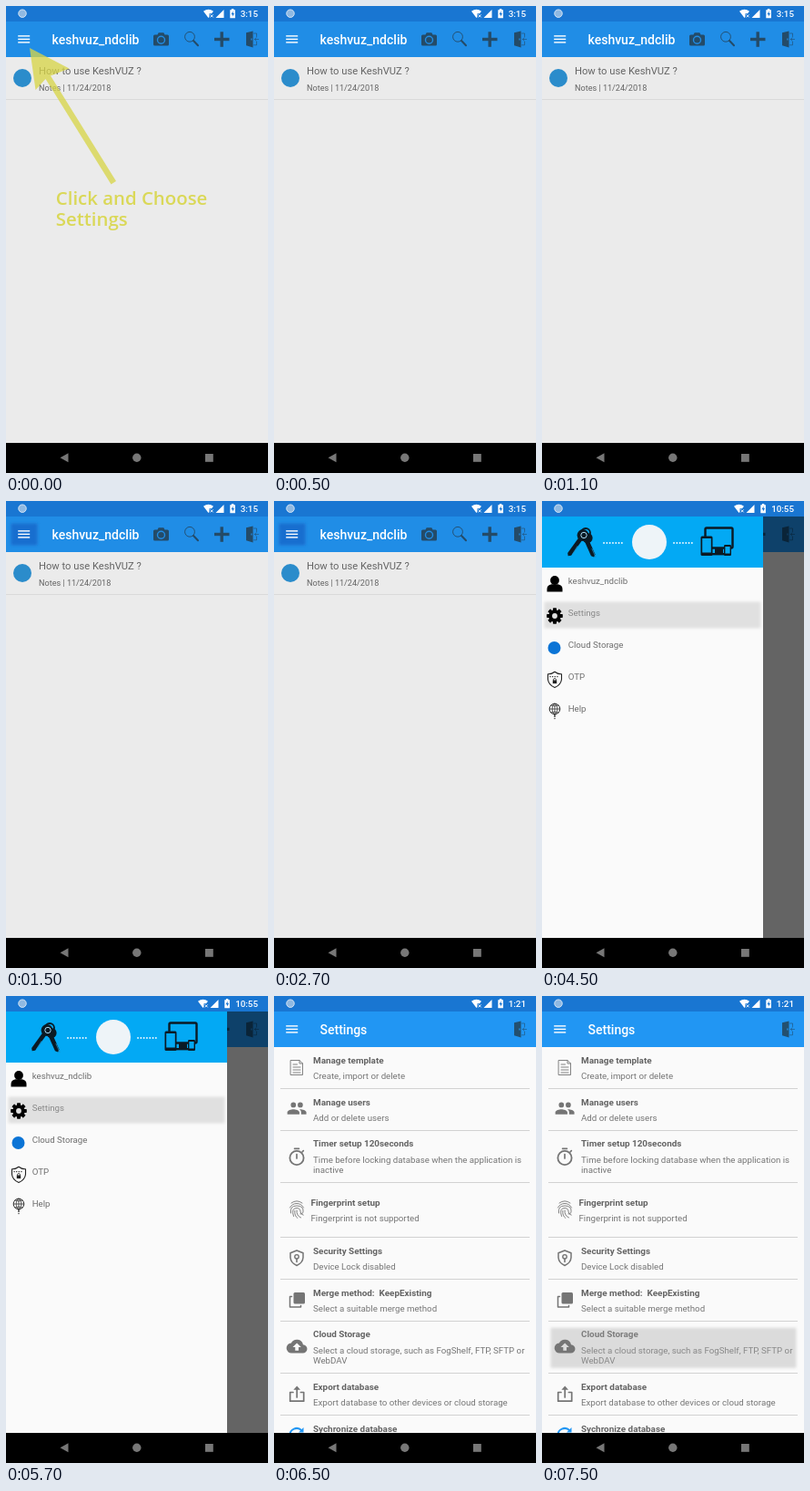
An HTML page that plays this animation: 288x512 px, repeating every 8000 ms.

```html
<!DOCTYPE html>
<html lang="en">
<head>
<meta charset="utf-8">
<title>Settings walkthrough</title>
<style>
html, body { margin: 0; width: 100%; height: 100%; overflow: hidden; background: #000; }
svg { display: block; width: 100%; height: 100%; font-family: Roboto, sans-serif; }
.bar { font-size: 14px; font-weight: 500; fill: #fff; }
.clock { font-size: 9.8px; font-weight: 500; fill: #fff; text-anchor: end; }
.item { font-size: 9.7px; }
.head { font-size: 9.9px; font-weight: 700; fill: #636363; }
.hint { font: 600 20.4px 'Open Sans', sans-serif; fill: #dad858; }
.line { fill: none; stroke-linecap: round; stroke-linejoin: round; }
</style>
</head>
<body>
<svg id="stage" viewBox="0 0 288 512" xmlns="http://www.w3.org/2000/svg"></svg>
<script>
const rect = (x, y, w, h, fill, more = '') =>
  `<rect x="${x}" y="${y}" width="${w}" height="${h}" fill="${fill}" ${more}/>`;
const disc = (x, y, r, fill) => `<circle cx="${x}" cy="${y}" r="${r}" fill="${fill}"/>`;
const ring = (x, y, r, color, w = 1) =>
  `<circle cx="${x}" cy="${y}" r="${r}" fill="none" stroke="${color}" stroke-width="${w}"/>`;
const shape = (d, fill, more = '') => `<path d="${d}" fill="${fill}" fill-rule="evenodd" ${more}/>`;
const line = (d, color, w = 1, more = '') =>
  `<path class="line" d="${d}" stroke="${color}" stroke-width="${w}" ${more}/>`;
const text = (x, y, s, cls, more = '') => `<text x="${x}" y="${y}" class="${cls}" ${more}>${s}</text>`;
const at = (x, y, body, scale = 1) => `<g transform="translate(${x} ${y}) scale(${scale})">${body}</g>`;
const group = (id, body) => `<g id="${id}">${body}</g>`;
const glow = (x, y, w, h, fill, alpha) =>
  rect(x, y, w, h, fill, `opacity="${alpha}" rx="1" filter="url(#soft)"`);

const APP = 'KeshVUZ', USER = 'keshvuz_ndclib';
const GREY = '#757575', DARK = '#244b68';
const page = (body, bar) => rect(0, 17, 288, 462, body) + rect(0, 17, 288, 39, bar);

// Status icons sit left of the clock, whose width depends on the time
function status(time, shift = 0) {
  return at(-shift, 0,
    shape('M217 5.8Q222.5 1.8 228 5.8L226 8.3H223.5V12L222.5 13Z', '#fff') +
    line('M225 9.7l2.4 2.4m0-2.4l-2.4 2.4', '#fff', .9) +
    shape('M239.5 4V13H230.5Z', '#fff') +
    shape('M246.3 4.2h1.6v-1.2h2.4v1.2h1.6v9h-5.6ZM249.6 5.6l-2.1 3.6h1.4v2.6l2.1-3.7h-1.4Z', '#fff')) +
    text(277, 12.4, time, 'clock');
}

const menu = [32.2, 35.7, 39.2].map(y => rect(13.2, y, 13, 1.4, '#fff')).join('');
const plus = rect(229, 34.8, 16.5, 3.4, DARK) + rect(235.5, 28.3, 3.4, 16.5, DARK);
const exit = color =>
  shape('M264 29.2L271.5 27.6V45.4L264 43.2ZM269.3 35.5v2h1.2v-2Z', color) +
  line('M272.5 30h3v3.5M272.5 42.8h3v-3.5M277.5 36.5h-4m1.6-1.8l-1.8 1.8l1.8 1.8', color, .8, 'opacity=".75"');

const camera =
  shape('M163.5 31.5h3l1.2-2.2h5.6l1.2 2.2h3q1.5 0 1.5 1.5v9q0 1.5-1.5 1.5h-14q-1.5 0-1.5-1.5v-9q0-1.5 1.5-1.5Z', DARK) +
  ring(170.5, 37.2, 4, '#208de6', 1.4);
const search = ring(202, 33.8, 5.4, DARK, .9) + line('M206 38l5 5.2', DARK, 2);

const home = page('#ebebeb', '#208de6') +
  group('press', glow(5.5, 24.5, 29, 24, '#1769cb', .85)) +
  menu + text(50.5, 41.6, USER, 'bar') + camera + search + plus + exit(DARK) + status('3:15') +
  disc(18, 79, 10, '#2b8ccb') +
  text(36, 75, `How to use ${APP} ?`, '', 'font-size="11.2" fill="#646464"') +
  text(36, 92.6, 'Notes | 11/24/2018', '', 'font-size="9.1" fill="#646464"') +
  rect(0, 102, 288, 1, '#dadada') +
  group('hint',
    shape('M26 46L69.5 68.5L49 76.5L121 192L115.5 195.5L43.5 80L32.5 92Z', '#d8d548', 'opacity=".76"') +
    text(54.8, 217.8, 'Click and Choose', 'hint') + text(54.8, 241, 'Settings', 'hint'));

// Drawer
const key = (angle, len) => `<g transform="rotate(${angle})">` +
  shape(`M-2.4 3h4.8v${len}l-2.4 2.5l-2.4-2.5Z`, '#0b1a24') + '</g>';
const keys = at(46, 36.5,
  key(36, 24) + key(-24, 22) + disc(-1, 1, 6.4, '#0b1a24') + disc(4, 4, 5.6, '#0b1a24') +
  ring(2, -1.5, 5, '#0b1a24', 1.8) + ring(0, 1, 3.2, '#a9d9f2', 1) +
  line('M-7 13l-5 8M9 16l4 9', '#1d8fc4', .8));
const devices = rect(179.5, 29.5, 30, 22, 'none', 'stroke="#0b1a24" stroke-width="2.4" rx="1.5"') +
  rect(190, 52, 9, 6, '#0b1a24') + rect(186, 57, 17, 2.4, '#0b1a24') +
  rect(174.5, 38.5, 13, 21.5, '#0b1a24', 'rx="1.5"') + rect(176.2, 41, 9.6, 15.5, '#03a9f4') +
  rect(200, 48, 8, 12, '#0b1a24', 'rx="1.2"') + rect(201.4, 50, 5.2, 7.5, '#03a9f4');
const dots = x => line(`M${x} 46h23`, '#e8f7ff', 1.8, 'stroke-dasharray=".1 3.2"');

const person = disc(14, 87, 4.9, '#000') + shape('M5.5 99.5v-3q0-4.2 5-5.2h7q5 1 5 5.2v3Z', '#000');
const gear = ring(14, 126, 4.8, '#000', 3.8) +
  Array.from({ length: 8 }, (_, i) =>
    `<rect x="12" y="117.2" width="4" height="4" rx=".7" transform="rotate(${i * 45} 14 126)"/>`).join('');
const otp = line('M14 187.2Q17.5 190 21.5 189.8V195.5Q21 201.5 14 204.5Q7 201.5 6.5 195.5V189.8Q10.5 190 14 187.2Z', '#222', 1.1) +
  rect(11.8, 196.5, 4.4, 3.6, '#222') + line('M12.6 196.5v-1.2q1.4-1.8 2.8 0v1.2', '#222', .8) +
  line('M9 192.6h10', '#222', 1.3, 'stroke-dasharray=".2 2.4"');
const globe = ring(14, 228, 5.8, '#333', 1) + line('M8.3 228h11.4M14 222.2v11.6M10 224q4 2 8 0M10 232q4-2 8 0', '#333', .8) +
  `<ellipse cx="14" cy="228" rx="2.8" ry="5.8" fill="none" stroke="#333" stroke-width=".8"/>` +
  line('M14 234v2.4M14 238.4v.1', '#333', 1.4);

const labels = [USER, 'Settings', 'Cloud Storage', 'OTP', 'Help'];
const drawer = page('#646464', '#0e416a') +
  rect(243, 34.8, 2.5, 3.2, '#0a2438') + exit('#0a2438') +
  rect(0, 17, 243, 462, '#fafafa') + rect(0, 17, 243, 56, '#03a9f4') +
  keys + dots(68) + disc(118, 45, 19, '#eef4f8') + dots(145) + devices +
  labels.map((s, i) => text(28.7, 91.2 + 35 * i, s, 'item', 'fill="#6e6e6e"')).join('') +
  group('pickSettings', glow(2.5, 110.5, 238, 29, '#b6b6b6', .37)) +
  person + gear + disc(13.5, 161, 7, '#0b74d6') + otp + globe + status('10:55', 6);

// Settings list: title baseline, title, subtitle lines, left edge
const rows = [
  [73.8, 'Manage template', ['Create, import or delete']],
  [119.7, 'Manage users', ['Add or delete users']],
  [165.4, 'Timer setup 120seconds', ['Time before locking database when the application is', 'inactive']],
  [229.8, 'Fingerprint setup', ['Fingerprint is not supported'], 40.5],
  [283, 'Security Settings', ['Device Lock disabled']],
  [328.6, 'Merge method:&#160; KeepExisting', ['Select a suitable merge method']],
  [374.4, 'Cloud Storage', ['Select a cloud storage, such as FogShelf, FTP, SFTP or', 'WebDAV']],
  [432, 'Export database', ['Export database to other devices or cloud storage']],
  [477.6, 'Sychronize database', []]
];
const row = ([y, title, subs, x = 43]) => text(x, y, title, 'head') +
  subs.map((s, i) => text(x, y + 17.4 + 11.5 * i, s, 'item', `fill="${GREY}"`)).join('');

const icons =
  line('M18.5 70.5h9.5l3.5 3.5v12.5h-13ZM28 70.5v3.5h3.5M21 75h4.5M21 78h8M21 81h8M21 84h8', GREY, .9) +
  at(13.7, 111.8, shape('M16 11a3 3 0 1 0 0-6a3 3 0 1 0 0 6ZM8 11a3 3 0 1 0 0-6a3 3 0 1 0 0 6Z' +
    'M8 13c-2.3 0-7 1.2-7 3.5V19h14v-2.5c0-2.3-4.7-3.5-7-3.5ZM16 13l-1 .1c1.2.8 2 1.9 2 3.4V19h6v-2.5c0-2.3-4.7-3.5-7-3.5Z', GREY), .95) +
  ring(25, 177.5, 7.6, GREY, 1.8) + line('M22.6 167.3h4.8M25 173.5v4.5M31 171l1.3-1.3', GREY, 1.7) +
  line('M19 227q6-4.5 12 0M17.5 232q2.5-4.5 7.5-4.5t7.5 4.5M18.5 238q-1.5-8 6.5-8t7 7q-.5 2.5-3 2' +
    'M21.5 241.5q-3-9 3.5-9q4 0 4.2 4.5q1 3 3 3.2M25 235q-.5 6 4.5 8M22.8 235.5q-.5 5.5 3 8', GREY, .9) +
  line('M25 279l7 2.8v5q-.5 6-7 8.7q-6.5-2.7-7-8.7v-5Z', GREY, 1.5) + ring(25, 285.8, 2.2, GREY, 1.4) +
  line('M25 288.5v3', GREY, 1.6) +
  rect(21.5, 325, 12.5, 12.5, GREY, 'rx="1.5"') + line('M19.5 329.5h-2v11.5h12v-1.5', GREY, 1.5) +
  at(14, 373, shape('M19.3 10A7.5 7.5 0 0 0 5.3 8A6 6 0 0 0 6 20H19A5 5 0 0 0 19.3 10ZM14 13v4h-4v-4H7l5-5l5 5Z', GREY), .93) +
  line('M21 434.5h-3.3v9.7h15v-9.7h-3.3M25.2 440v-10', GREY, 1.7) + shape('M21.4 431.8l3.8-4.3l3.8 4.3Z', GREY) +
  line('M17.5 482a7.5 7.5 0 0 1 12.8-5.8', '#2196f3', 2) + shape('M32.5 473v5.5h-5.5Z', '#2196f3');

const settings = page('#fafafa', '#2196f3') +
  menu + text(50.5, 41.6, 'Settings', 'bar') + exit('#23506f') + status('1:21') +
  rows.map(row).join('') +
  [101, 147, 204, 264, 310, 356, 413, 459].map(y => rect(7, y, 274, 1, '#d2d2d2')).join('') +
  group('pickCloud', glow(9.5, 363.8, 270, 44, '#a8a8a8', .37)) + icons;

const nav = rect(0, 479, 288, 33, '#000') + shape('M59.5 495.2l9-5v10Z', '#777') +
  disc(143.8, 495.2, 4.7, '#777') + rect(219, 491, 8.8, 8.8, '#777');

const stage = document.getElementById('stage');
stage.innerHTML = '<defs><filter id="soft" x="-20%" y="-20%" width="140%" height="140%">' +
  '<feGaussianBlur stdDeviation="1.4"/></filter></defs>' +
  rect(0, 0, 288, 17, '#1976d2') + disc(18, 8.2, 4.5, '#8fb9e2') + ring(18, 8.2, 4.2, '#d3e4f5', .9) +
  group('home', home) + group('drawer', drawer) + group('settings', settings) + nav;

// Visible span of each layer in ms
const spans = {
  home: [0, 3500], hint: [0, 500], press: [1500, 3500],
  drawer: [3500, 6500], pickSettings: [4500, 6500],
  settings: [6500, 8000], pickCloud: [7500, 8000]
};
const layers = Object.entries(spans).map(([id, span]) => [document.getElementById(id), ...span]);

function draw() {
  const t = performance.now() % 8000;
  for (const [el, from, to] of layers) el.style.display = t >= from && t < to ? '' : 'none';
  requestAnimationFrame(draw);
}
draw();
</script>
</body>
</html>
```
